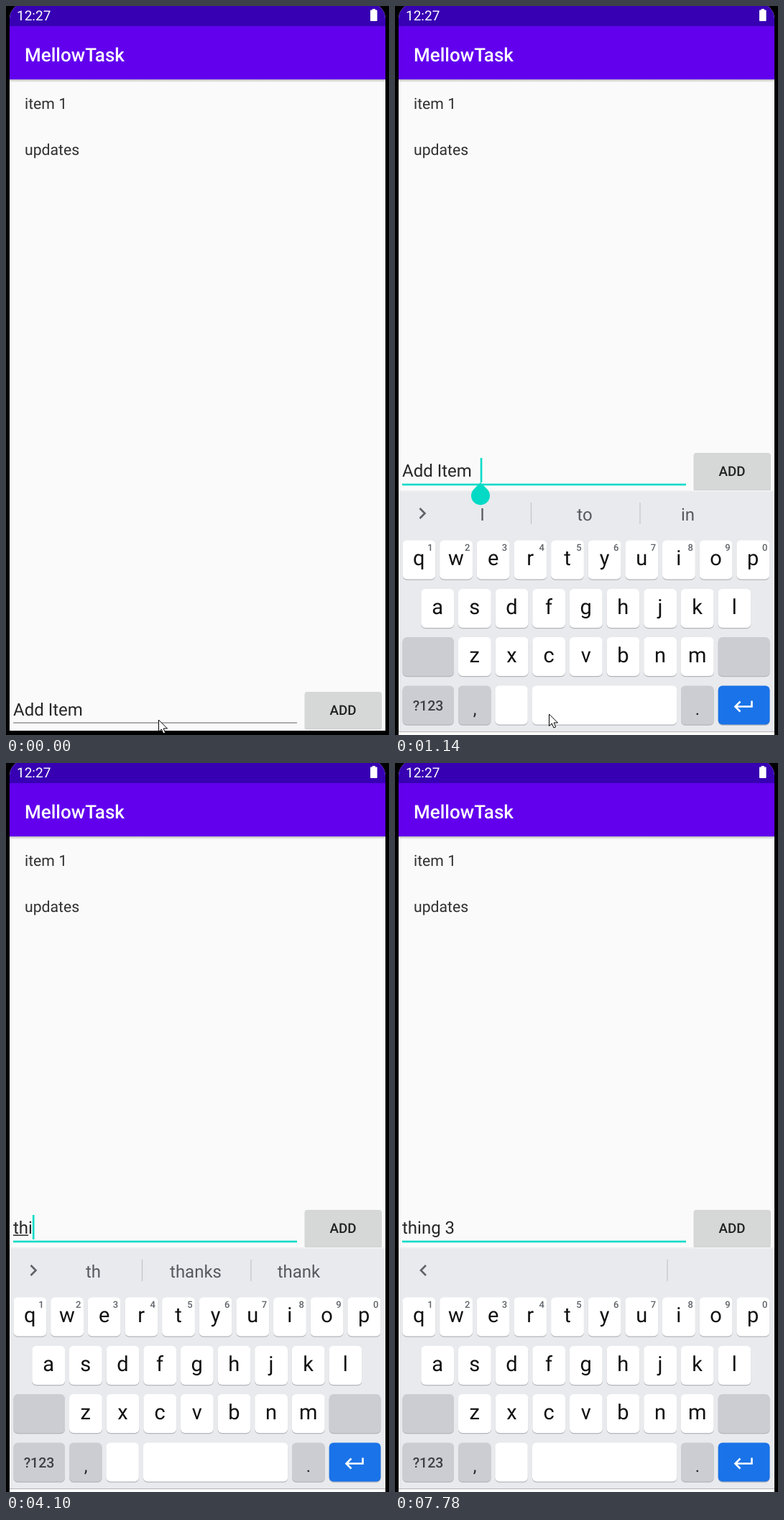
These frames come from a looping animation (533x1013 px, 8 s). An HTML page:

```html
<!DOCTYPE html>
<html lang="en">
<head>
<meta charset="utf-8">
<title>Todo app</title>
<style>
html, body { margin: 0; width: 100%; height: 100%; overflow: hidden; background: #000; }
svg { display: block; width: 100vw; height: 100vh; font-family: Roboto, sans-serif; }
text { white-space: pre; text-rendering: geometricPrecision; }
</style>
</head>
<body>
<svg id="stage" viewBox="0 0 533 1013">
  <defs>
    <clipPath id="screen"><rect x="5" y="-3.500" width="523" height="1040" rx="21"/></clipPath>
    <linearGradient id="shade" x1="0" y1="0" x2="0" y2="1">
      <stop offset="0" stop-opacity=".25"/><stop offset="1" stop-opacity="0"/>
    </linearGradient>
  </defs>
  <rect width="533" height="1013"/>
  <g clip-path="url(#screen)">
    <rect x="5" width="523" height="1007" fill="#fafafa"/>
    <rect x="5" width="523" height="28" fill="#3700b3"/>
    <rect x="5" y="28" width="523" height="74" fill="#6200ee"/>
    <rect x="5" y="102" width="523" height="4" fill="url(#shade)"/>
    <text x="15" y="20" font-size="19" fill="#fff">12:27</text>
    <path d="M507 6.500q0-1 1-1h1.800V4h4V5.500h1.800q1 0 1 1V20q0 1-1 1h-7.600q-1 0-1-1z" fill="#fff"/>
    <text x="26" y="76.500" font-size="26" font-weight="500" fill="#fff">MellowTask</text>
    <g font-size="21.200" fill="#303030">
      <text x="26" y="143">item 1</text>
      <text x="26" y="207">updates</text>
    </g>
    <g id="form">
      <rect x="415.500" y="954" width="107.500" height="51.500" rx="3" fill="#000" opacity=".16"/>
      <rect x="416" y="953" width="106.500" height="51" rx="3" fill="#d6d7d7"/>
      <text x="469" y="985" font-size="18.800" font-weight="500" text-anchor="middle" fill="#212121">ADD</text>
      <rect id="line" x="10" width="395"/>
      <text id="entry" x="10" y="986" font-size="24" fill="#272727"></text>
      <rect id="mark" y="987.500" height="1.500" fill="#272727"/>
      <rect id="caret" y="960" width="2.600" height="34" fill="#03dac5"/>
    </g>
    <g id="keyboard"></g>
    <path id="handle" d="M119 662l9.200 9.200a13 13 0 1 1-18.400 0z" fill="#03dac5"/>
  </g>
  <path id="pointer" d="M0 0V16.500L3.800 13L6.500 19L9.200 17.800L6.600 12H12Z" fill="#fff" stroke="#000" stroke-linejoin="round"/>
</svg>
<script>
const LOOP = 8000;
const FIELD_LIFT = -332;
const $ = id => document.getElementById(id);

function add(parent, tag, attrs, text = "") {
  const el = document.createElementNS("http://www.w3.org/2000/svg", tag);
  set(el, attrs);
  el.textContent = text;
  parent.append(el);
  return el;
}

function set(el, attrs) {
  for (const name in attrs) el.setAttribute(name, attrs[name]);
}

function show(el, on) {
  el.setAttribute("visibility", on ? "visible" : "hidden");
}

function label(x, y, text, size, fill, weight = 400) {
  return add($("keyboard"), "text", {
    x, y, "font-size": size, fill, "font-weight": weight, "text-anchor": "middle"
  }, text);
}

function key(x, y, width, fill = "#fff") {
  const box = { x, width, height: 54, rx: 6 };
  add($("keyboard"), "rect", { ...box, y: y + 1.3, fill: "#b3b5ba" });
  add($("keyboard"), "rect", { ...box, y, fill });
}

function letters(x, y, chars) {
  [...chars].forEach((char, i) => {
    const left = x + i * 51.65;
    key(left, y, 45.8);
    label(left + 22.8, y + 34.5, char, 29, "#111");
  });
}

const kb = $("keyboard");
add(kb, "rect", { x: 5, y: 674, width: 523, height: 334.5, fill: "#e8eaed" });
add(kb, "rect", { x: 5, y: 1008.5, width: 523, height: 6, fill: "#fafafa" });
add(kb, "rect", { x: 5, y: 673, width: 523, height: 2, fill: "#eff0f1" });

const chevron = add(kb, "path", { fill: "none", stroke: "#5f6368", "stroke-width": 2.6 });
const dividers = [189.5, 341, 379].map(x =>
  add(kb, "rect", { x: x - .6, y: 690, width: 1.2, height: 30, fill: "#c3c6ca" }));
const hints = [121.5, 264, 407.5].map(x => label(x, 714.5, "", 24, "#56595e"));

letters(10.5, 742.5, "qwertyuiop");
[..."1234567890"].forEach((n, i) => label(49 + i * 51.75, 757, n, 13, "#5f6368", 500));
letters(36.3, 810, "asdfghjkl");
letters(88, 877, "zxcvbnm");
const GREY = "#cccdd2";
key(10.5, 877, 71.5, GREY);
key(449.7, 877, 71.8, GREY);
key(10.5, 944.5, 71.5, GREY);
key(88, 944.5, 45.5, GREY);
key(139.3, 944.5, 45.5);
key(191, 944.5, 201.3);
key(398, 944.5, 45.7, GREY);
key(449.7, 944.5, 71.8, "#1a73e8");
label(46, 979, "?123", 19.5, "#3c4043", 500);
label(111, 985, ",", 24, "#222");
label(421, 985, ".", 24, "#222");
add(kb, "path", {
  d: "M496.500 965.500V973.500H474M480.500 966.500L473.500 973.500L480.500 980.500",
  fill: "none", stroke: "#fff", "stroke-width": 2.6
});

// Each step overrides part of the state; mark is the underlined character range.
const START = {
  text: "Add Item  ", mark: [0, 0], caret: false, focus: false, lifted: false,
  drop: 340, handle: false, pointer: [212.5, 992], words: ["I", "to", "in"], tools: false
};
const STEPS = [
  [530, { focus: true }],
  [780, { lifted: true, caret: true, handle: true, pointer: [214.5, 984] }],
  [900, { drop: 150 }],
  [1020, { drop: 42 }],
  [1140, { drop: 0 }],
  [1820, { caret: false, pointer: null }],
  [2190, { caret: true }],
  [2440, { text: "Add Item ", handle: false }],
  [2810, { text: "Add Ite", mark: [4, 7] }],
  [2960, { text: "Add", mark: [0, 3] }],
  [3080, { text: "", mark: [0, 0], words: ["I", "the", "it"] }],
  [3580, { caret: false }],
  [3830, { text: "t", caret: true }],
  [4100, { text: "thi", mark: [0, 2], words: ["th", "thanks", "thank"] }],
  [4350, { text: "thin", mark: [0, 3], words: ["thi", "think", "this"] }],
  [4630, { mark: [0, 4], words: ["thin", "think", "things"] }],
  [5030, { caret: false }],
  [5150, { text: "thing", caret: true }],
  [5410, { mark: [0, 5], words: ["thing", "things", "think"] }],
  [5970, { caret: false }],
  [6470, { caret: true }],
  [6970, { text: "thing " }],
  [7280, { text: "thing 3", mark: [0, 0], words: ["is", "to", "and"] }],
  [7530, { tools: true }],
  [7780, { caret: false }]
];

function stateAt(t) {
  return Object.assign({}, START, ...STEPS.filter(([at]) => at <= t).map(step => step[1]));
}

function textEnd(count, text) {
  return 10 + (count ? $("entry").getSubStringLength(0, Math.min(count, text.length)) : 0);
}

function draw(t) {
  const s = stateAt(t);
  set($("form"), { transform: `translate(0 ${s.lifted ? FIELD_LIFT : 0})` });
  set($("line"), s.focus
    ? { y: 995.7, height: 2.6, fill: "#03dac5" }
    : { y: 995.2, height: 1.8, fill: "#a5a5a5" });

  $("entry").textContent = s.text.replace(/ /g, "\u00a0");
  const [from, to] = s.mark.map(n => textEnd(n, s.text));
  set($("mark"), { x: from, width: to - from });
  set($("caret"), { x: textEnd(s.text.length, s.text) });
  show($("caret"), s.caret);
  show($("handle"), s.handle);

  set(kb, { transform: `translate(0 ${s.drop})` });
  show(kb, s.drop < 340);
  set(chevron, { d: s.tools ? "M43 698L36 705L43 712" : "M34.500 698L41.500 705L34.500 712" });
  dividers.forEach((el, i) => show(el, s.drop < 340 && s.tools === (i === 2)));
  hints.forEach((el, i) => { el.textContent = s.tools ? "" : s.words[i]; });

  show($("pointer"), s.pointer);
  if (s.pointer) set($("pointer"), { transform: `translate(${s.pointer})` });
}

const begin = performance.now();
function tick() {
  draw((performance.now() - begin) % LOOP);
  requestAnimationFrame(tick);
}
tick();
</script>
</body>
</html>
```
